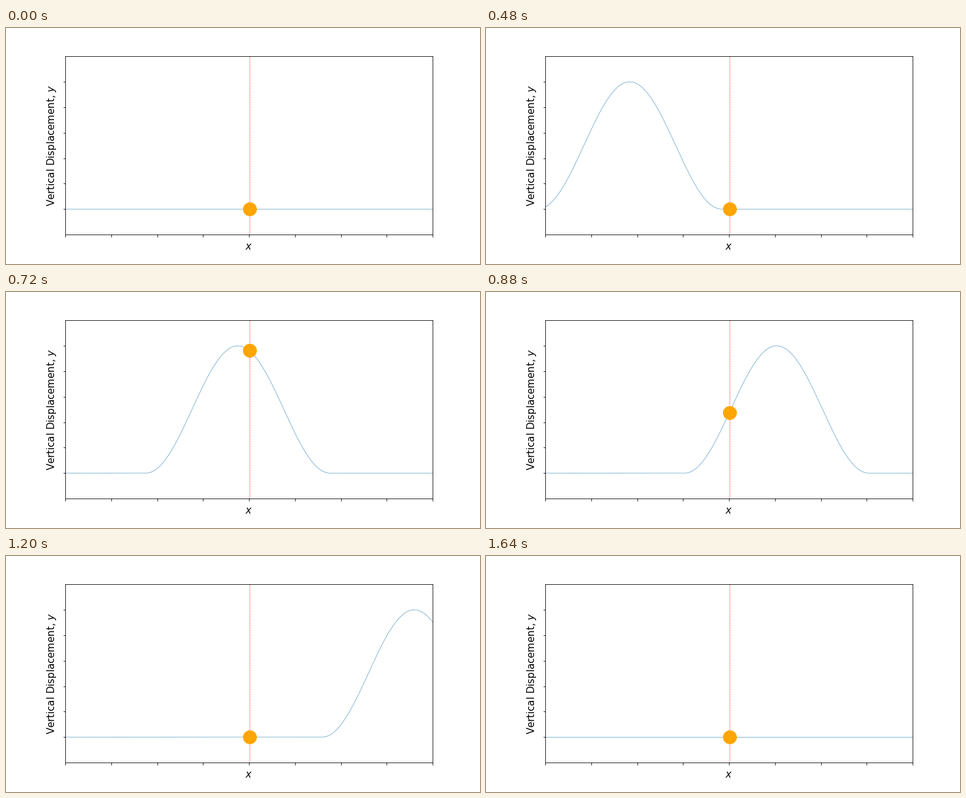
Animation of 720 by 360 pixels, one loop 2000 ms. Source, as a matplotlib script:

```python
import numpy as np
import matplotlib.pyplot as plt
from matplotlib.animation import FuncAnimation

FRAMES = 50
INTERVAL = 40   # ms
STEP = 0.32     # pulse travel per frame
HALF_WIDTH = 2.0


def pulse(x, frame):
    """Raised-cosine pulse travelling to the right."""
    d = x - (STEP * frame - HALF_WIDTH)
    shape = 0.5 * (1 + np.cos(np.pi * d / HALF_WIDTH))
    return np.where(np.abs(d) < HALF_WIDTH, shape, 0.0)


# The string runs past both edges of the view.
x = np.linspace(-4, 12, 1000)
mid = len(x) // 2

fig, ax = plt.subplots(figsize=(10, 5), dpi=72)
fig.subplots_adjust(left=0.125, right=0.9, bottom=0.125, top=0.88)
ax.set(xlim=(0, 8), ylim=(-0.2, 1.2))
ax.set_xticks(np.arange(9), labels=[""] * 9)
ax.set_yticks(np.arange(6) * 0.2, labels=[""] * 6)
ax.set_xlabel("$x$", fontsize=15)
ax.set_ylabel("Vertical Displacement, $y$", fontsize=15)

ax.axvline(x[mid], color="red", linestyle=":", linewidth=1)
wave, = ax.plot(x, pulse(x, 0), linewidth=0.5)
bead, = ax.plot([x[mid]], [0], "o", color="orange", markersize=20)


def update(frame):
    y = pulse(x, frame)
    wave.set_ydata(y)
    bead.set_ydata([y[mid]])
    return wave, bead


anim = FuncAnimation(fig, update, frames=FRAMES, interval=INTERVAL,
                     repeat=True, repeat_delay=0)
plt.show()
```
